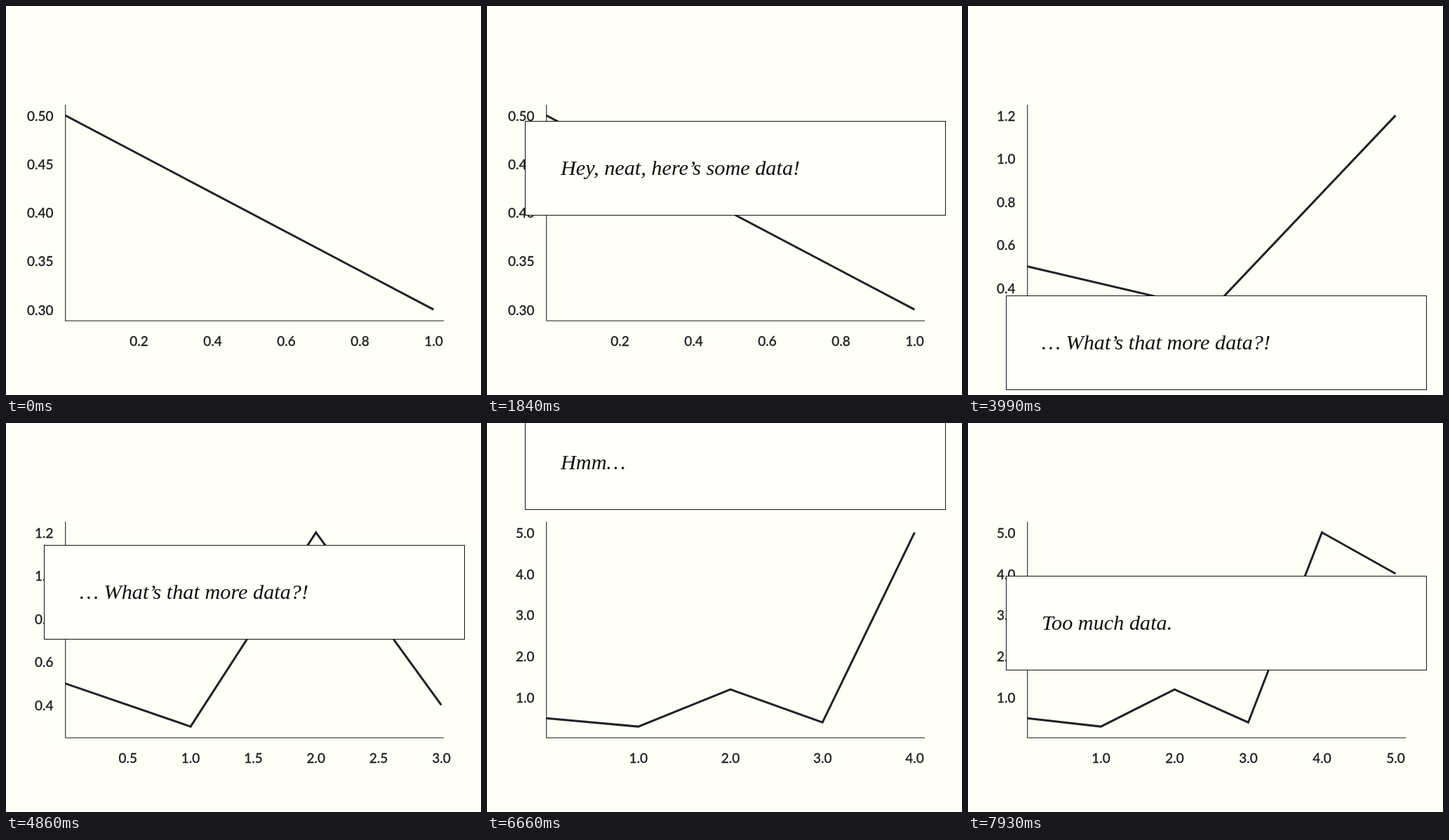
Animation, 677 px wide and 555 px high, one loop 8000 ms. Source, as an HTML page:

```html
<!DOCTYPE html>
<html lang="en">
<head>
<meta charset="utf-8">
<title>Scrolling chart story</title>
<style>
  html, body { margin: 0; width: 100%; height: 100%; overflow: hidden; background: #fffff8; }
  svg { display: block; width: 677px; height: 555px; }
  .axis { fill: none; stroke: #444; stroke-width: 1.3; }
  .series { fill: none; stroke: #222; stroke-width: 3; }
  .label { font: 500 19px Lato, sans-serif; fill: #222; stroke: #222; stroke-width: .3; }
  .box { fill: #fffffb; stroke: #111; stroke-width: 1; }
  .story { font: italic 30.25px "Liberation Serif", serif; fill: #111; }
</style>
</head>
<body>
<svg viewBox="0 0 677 555">
  <clipPath id="plot"><rect x="84" y="141" width="540" height="308"/></clipPath>
  <path class="axis" d="M84.7 141V449.2H624"/>
  <g id="chart"></g>
  <g id="boxes"></g>
</svg>
<script>
const LOOP = 8000, STEP = 89, TRANSITION = 500;
const BOX_GAP = 587, TRIGGER = 275;
const LEFT = 84.4, BOTTOM = 433.1, WIDTH = 525, HEIGHT = 277;
const values = [0.5, 0.3, 1.2, 0.4, 5, 4];
const stories = ['Hey, neat, here’s some data!', '…', '… What’s that more data?!', 'Hmm…', 'Too much data.'];

const mix = (a, b, k) => a + (b - a) * k;
const clamp = v => Math.max(0, Math.min(1, v));
const easeInOut = k => k < 0.5 ? 4 * k ** 3 : 1 - (2 - 2 * k) ** 3 / 2;

// Each flick of the wheel scrolls on from where the last one stopped; power above 1 slows down, below 1 speeds up
let rest = -555;
const flick = (start, end, to, power = 1.75) => {
  const steps = Math.round((end - start) / STEP);
  const length = (end - start) / steps;
  const from = rest;
  rest = to;
  return { start, end, steps, length, from, to, power, begin: start - length };
};
const flicks = [
  flick(720, 1140, -350), flick(1430, 2020, -50, 0.7), flick(2370, 3150, 378),
  flick(3240, 3990, 761), flick(4260, 5030, 1015), flick(5120, 5480, 1401),
  flick(5750, 6540, 1598), flick(6660, 6920, 2038), flick(7220, 7930, 2130)
];

// Moment at which a box passes the trigger line
function passTime(box) {
  const scroll = box * BOX_GAP - TRIGGER;
  const { begin, end, from, to, power } = flicks.find(f => f.to >= scroll);
  return mix(end, begin, ((to - scroll) / (to - from)) ** (1 / power));
}
const reveals = stories.map((_, i) => passTime(i)).slice(1);

// The picture advances in discrete steps during a flick and rests in between
function sample(t) {
  const f = flicks.filter(f => f.start <= t).pop();
  if (!f) return { time: 0, scroll: -BOX_GAP };
  const step = Math.min(f.steps, Math.floor((t - f.start) / f.length + 0.15));
  const k = (step + 1) / (f.steps + 1);
  return { time: f.start + step * f.length, scroll: mix(f.to, f.from, (1 - k) ** f.power) };
}

// Round tick values, about five per axis
function ticks(low, high) {
  const raw = (high - low) / 5, base = 10 ** Math.floor(Math.log10(raw)), ratio = raw / base;
  const step = base * (ratio >= Math.sqrt(50) ? 10 : ratio >= Math.sqrt(10) ? 5 : ratio >= Math.SQRT2 ? 2 : 1);
  const list = [];
  for (let i = Math.ceil(low / step - 1e-6); i * step <= high + 1e-9; i++) if (i) list.push(i * step);
  const digits = list[list.length - 1] > 0.999 ? 1 : 2;
  return list.map(value => ({ value, text: value.toFixed(digits) }));
}

const label = (x, y, anchor, text) =>
  `<text class="label" x="${x}" y="${y}" text-anchor="${anchor}">${text}</text>`;

function drawChart(t) {
  const stage = reveals.filter(start => start <= t).length;
  const k = stage ? easeInOut(clamp((t - reveals[stage - 1]) / TRANSITION)) : 1;
  const last = stage || 1, min = Math.min(...values);
  const maxUpTo = n => Math.max(...values.slice(0, n + 1));
  const xMax = mix(last, stage + 1, k);
  const range = mix(maxUpTo(last), maxUpTo(stage + 1), k) - min;
  const X = v => LEFT + WIDTH * v / xMax;
  const Y = v => BOTTOM - HEIGHT * (v - min) / range;
  const points = values.slice(0, stage + 2).map((v, i) => `${X(i)},${Y(v)}`).join(' ');
  const margin = range * 0.056;
  chart.innerHTML =
    `<polyline class="series" clip-path="url(#plot)" points="${points}"/>` +
    ticks(0, xMax * 540 / WIDTH).map(d => label(X(d.value), 484.5, 'middle', d.text)).join('') +
    ticks(min - margin, min + range + margin).map(d => label(67.5, Y(d.value) + 7.5, 'end', d.text)).join('');
}

function drawBoxes(scroll) {
  boxes.innerHTML = stories.map((text, i) =>
    `<g transform="translate(54.5 ${Math.round(i * BOX_GAP - scroll) + 0.5})">` +
    `<rect class="box" width="599" height="134"/><text class="story" x="50.5" y="76.5">${text}</text></g>`
  ).join('');
}

const chart = document.getElementById('chart');
const boxes = document.getElementById('boxes');

function frame() {
  const { time, scroll } = sample(performance.now() % LOOP);
  drawChart(time);
  drawBoxes(scroll);
  requestAnimationFrame(frame);
}
frame();
</script>
</body>
</html>
```
